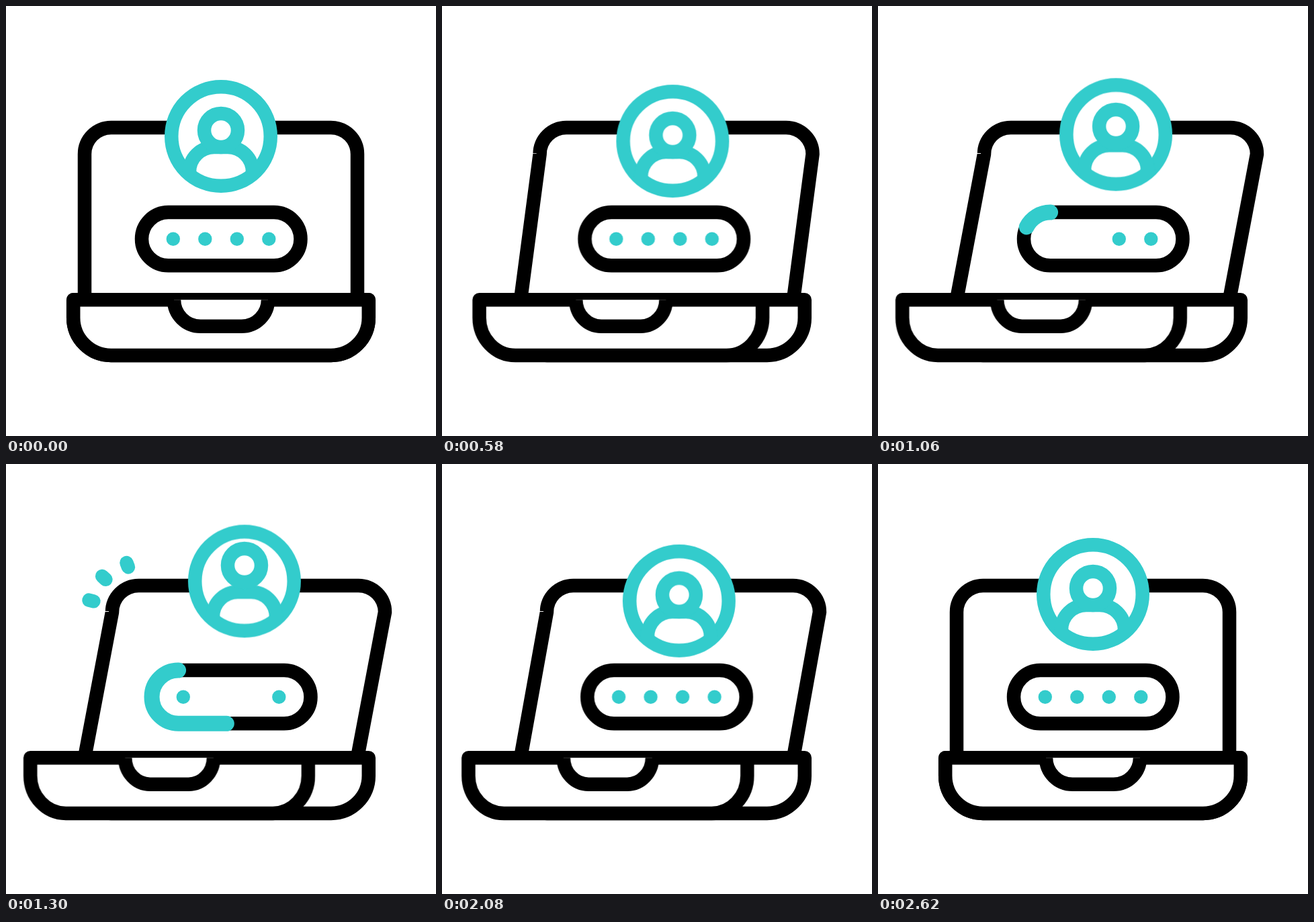
An HTML page that plays this animation: 640x640 px, repeating every 3000 ms.

```html
<!DOCTYPE html>
<html lang="en">
<head>
<meta charset="utf-8">
<title>Laptop login</title>
<style>
  @property --head { syntax: "<length>"; inherits: false; initial-value: 0px; }
  @property --tail { syntax: "<length>"; inherits: false; initial-value: 0px; }

  html, body { margin: 0; width: 100%; height: 100%; overflow: hidden; background: #fff; }
  svg {
    display: block; width: 640px; height: 640px;
    --ease: cubic-bezier(.3333, 0, .6667, 1);
  }
  .line { fill: none; stroke: #000; stroke-width: 20.5; stroke-linejoin: round; }
  .teal { stroke: #3cc; }
  .dots { fill: #3cc; }

  /* Opening and closing turn: 200-800 ms and 2000-2600 ms */
  .turn { animation: turn 3s var(--ease) infinite; }
  @keyframes turn {
    0%, 6.6667%, 86.6667%, 100% { transform: none; }
    26.6667%, 66.6667% { transform: var(--to); }
  }
  .field { --to: translate(15px, 0); }
  .front { --to: translate(-64px, 0) scaleX(.941); transform-origin: 100px 0; }
  .front path { fill: #fff; vector-effect: non-scaling-stroke; }

  .screen { animation: lean 3s var(--ease) infinite; }
  @keyframes lean {
    0%, 6.6667%, 86.6667%, 100% {
      d: path("M117 437L117 220.5C117 198.7 134.7 181 156.5 181L483.5 181C505.3 181 523 198.7 523 220.5L523 437");
    }
    26.6667%, 66.6667% {
      d: path("M117 437L158 220.5C158 198.7 175.7 181 197.5 181L524.5 181C546.3 181 564 198.7 564 220.5L523 437");
    }
  }
  .nick { stroke: #fff; animation: nick 3s var(--ease) infinite; }
  @keyframes nick {
    0%, 6.6667%, 86.6667%, 100% { transform: none; opacity: 0; }
    26.6667%, 66.6667% { transform: translate(41px, 0); opacity: 1; }
  }

  .avatar { animation: avatar 3s var(--ease) infinite; }
  @keyframes avatar {
    0%, 6.6667%, 86.6667%, 100% { transform: translate(0, 0); }
    26.6667% { transform: translate(33.5px, 10.3px); }
    46.6667% { transform: translate(35px, -21.9px); }
    66.6667% { transform: translate(34.6px, 10.3px); }
  }
  .face { animation: nod 3s var(--ease) infinite; }
  @keyframes nod {
    0%, 30.3333%, 70.3333%, 100% { transform: translate(0, 0); }
    50.3333% { transform: translate(0, -20.3px); }
  }

  .dots circle { animation: blink 3s step-end calc(var(--i) * 200ms) infinite; }
  @keyframes blink {
    0%, 40%, 100% { visibility: visible; }
    27% { visibility: hidden; }
  }

  /* Visible part of a path runs from --tail to --head (path length 100) */
  .trim {
    stroke-linecap: round;
    stroke-dasharray: max(0px, var(--head) - var(--tail)) 999px;
    stroke-dashoffset: calc(-1 * var(--tail));
    animation: 3s var(--ease) infinite;
  }
  .ring {
    stroke-width: 23;
    animation-name: ring-head, ring-tail, ring-show;
    animation-timing-function: var(--ease), var(--ease), step-end;
  }
  .ray {
    stroke-width: 20.5;
    animation-name: ray-head, ray-tail, ray-show;
    animation-timing-function: var(--ease), var(--ease), step-end;
  }
  @keyframes ring-head { 0%, 29.3333% { --head: 0px; } 64.6667%, 100% { --head: 100px; } }
  @keyframes ring-tail { 0%, 43.3333% { --tail: 0px; } 64%, 100% { --tail: 100px; } }
  @keyframes ring-show { 0%, 64%, 100% { visibility: hidden; } 29.6% { visibility: visible; } }
  @keyframes ray-head { 0%, 38.3333% { --head: 0px; } 59.6667%, 100% { --head: 100px; } }
  @keyframes ray-tail { 0%, 39.6667% { --tail: 0px; } 65.3333%, 100% { --tail: 100px; } }
  @keyframes ray-show { 0%, 65%, 100% { visibility: hidden; } 39% { visibility: visible; } }
</style>
</head>
<body>
<svg viewBox="0 0 640 640">
  <defs>
    <path id="base" d="M100.2 437.2V464a56 56 0 0 0 56 56H483.8a56 56 0 0 0 56-56V437.2Z"/>
  </defs>

  <path class="line screen" d="M117 437L117 220.5C117 198.7 134.7 181 156.5 181L483.5 181C505.3 181 523 198.7 523 220.5L523 437"/>
  <path class="nick" d="M105 219.5h7"/>

  <use href="#base" class="line"/>
  <g class="line turn front">
    <path d="M100.2 437.2V464a56 56 0 0 0 56 56H483.8a56 56 0 0 0 56-56V437.2Z"/>
    <path d="M250 437.2a39.5 39.5 0 0 0 39.5 39.5h61a39.5 39.5 0 0 0 39.5-39.5"/>
  </g>

  <g class="turn field">
    <rect class="line" x="202" y="307.1" width="236.5" height="79.2" rx="39.6"/>
    <g class="dots">
      <circle style="--i:0" cx="248.8" cy="346.7" r="10.2"/>
      <circle style="--i:1" cx="296.3" cy="346.7" r="10.2"/>
      <circle style="--i:2" cx="343.8" cy="346.7" r="10.2"/>
      <circle style="--i:3" cx="391.3" cy="346.7" r="10.2"/>
    </g>
    <path class="line teal trim ring" pathLength="100"
      d="M241.6 307.1a39.6 39.6 0 0 0 0 79.2h157.3a39.6 39.6 0 0 0 0-79.2z"/>
  </g>

  <path class="line teal trim ray" pathLength="100" d="M183.5 157.5L155 84"/>
  <path class="line teal trim ray" pathLength="100" d="M152 175L89 118"/>
  <path class="line teal trim ray" pathLength="100" d="M135 205.5L53 185"/>

  <g class="line teal avatar">
    <circle cx="320" cy="194" r="73.75" fill="#fff"/>
    <path d="M273 247a37 37 0 0 1 37-37h20a37 37 0 0 1 37 37"/>
    <circle class="face" cx="320" cy="185" r="25" fill="#fff"/>
  </g>
</svg>
</body>
</html>
```
